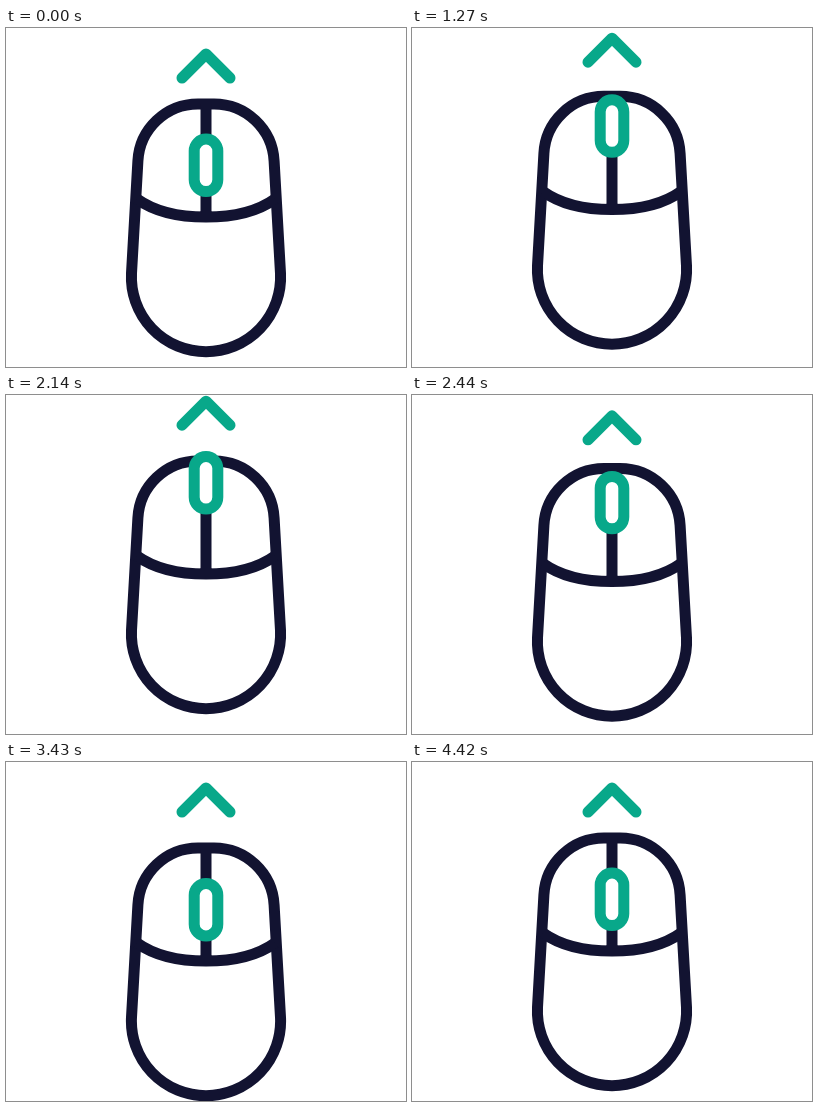
Recreate the animation shown at these times as an HTML page. Size 400 by 339 pixels, loop 4450 ms.

```html
<!DOCTYPE html>
<html lang="en">
<head>
<meta charset="utf-8">
<title>Mouse scroll</title>
<style>
  html, body { margin: 0; width: 100%; height: 100%; overflow: hidden; background: #fff; }
  svg { display: block; width: 100%; height: 100%; }
  .dark { stroke: #121331; }
  .green { stroke: #08a88a; }
</style>
</head>
<body>
<svg viewBox="0 0 400 339" fill="none" stroke-width="11" stroke-linejoin="round">
  <g id="body" class="dark">
    <path d="M192 75.9H208A60.2 60.2 0 0 1 268.1 133L274.5 245.3A74.6 74.6 0 1 1 125.5 245.3L131.9 133A60.2 60.2 0 0 1 192 75.9Z"/>
    <path d="M131 171C147 182.5 172 189.1 200 189.1S253 182.5 269 171M200 76V188"/>
  </g>
  <rect id="wheel" class="green" x="188.2" y="111.1" width="23.6" height="52.4" rx="11.8" fill="#fff"/>
  <path id="arrow" class="green" d="M176 50L200 26L224 50" stroke-linecap="round"/>
</svg>
<script>
  const LOOP = 4450;
  const BEAT = 400;        // half of one scroll stroke
  const ARROW_BEAT = 390;
  const LIFT = 10;         // body travel either way
  const [body, wheel, arrow] = ["body", "wheel", "arrow"].map(id => document.getElementById(id));

  // Smooth 0 to 1 step that begins at `from` and takes `span` ms.
  function ramp(t, from, span) {
    const u = Math.min(1, Math.max(0, (t - from) / span));
    return u * u * (3 - 2 * u);
  }

  // Rise from 0 to 1 and fall back.
  const bump = (t, from, up, down = up) => ramp(t, from, up) - ramp(t, from + up, down);

  const shift = (el, y) => el.setAttribute("transform", `translate(0 ${y.toFixed(3)})`);

  function draw(t) {
    const bodyY = LIFT * (2 * ramp(t, 2200, 580) - ramp(t, 1000, BEAT) - ramp(t, 3800, 600));
    const wheelUp = bump(t, 1000, BEAT) + bump(t, 1800, BEAT, 2 * BEAT);
    const wheelDown = bump(t, 2200, 2 * BEAT, BEAT) + bump(t, 3400, BEAT, 600);
    const arrowUp = bump(t, 1000, ARROW_BEAT) + bump(t, 1790, ARROW_BEAT);
    shift(body, bodyY);
    shift(wheel, bodyY - 42 * wheelUp + 26.4 * wheelDown);
    shift(arrow, -20.4 * arrowUp);
  }

  const start = performance.now();
  function tick() {
    draw((performance.now() - start) % LOOP);
    requestAnimationFrame(tick);
  }
  tick();
</script>
</body>
</html>
```
